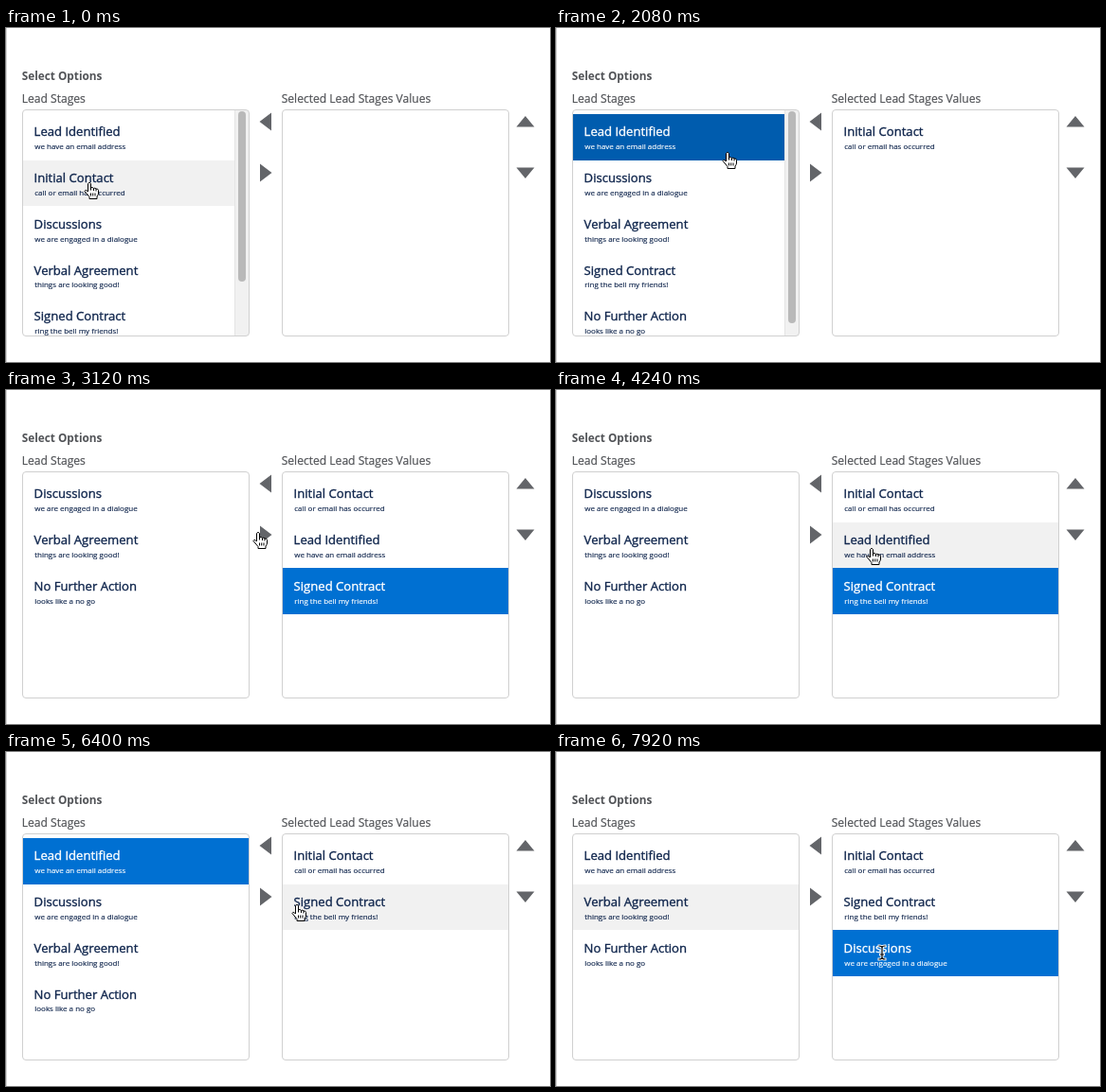
An HTML page for the animation above (8000 ms loop, 574 px wide and 353 px high).

```html
<!DOCTYPE html>
<html>
<head>
<meta charset="utf-8">
<style>
  html, body { margin: 0; width: 100%; height: 100%; overflow: hidden; background: #fff; }
  svg { display: block; font-family: "Open Sans", sans-serif; }
  .head { font-size: 12.1px; fill: #515357; stroke: #515357; stroke-width: .2; }
  .title { font-size: 11.8px; font-weight: 700; stroke: none; }
  .name { font-size: 13.1px; stroke-width: .35; }
  .note { font-size: 8px; stroke-width: .15; }
</style>
</head>
<body>
<svg width="574" height="353" viewBox="0 0 574 353">
  <clipPath id="inside"><path d="M18 87H256V325H18ZM292 87H530V325H292Z"/></clipPath>
  <path d="M.5 0V353" stroke="#d4d4d4"/>
  <text class="head title" x="16.7" y="55">Select Options</text>
  <text class="head" x="16.7" y="79">Lead Stages</text>
  <text class="head" x="290.7" y="79">Selected Lead Stages Values</text>
  <path d="M267.5 99L280 89.5V108.5ZM280.5 153L268 143.5V162.5ZM548 93L557.5 104.5H538.5ZM548 159L557.5 147.5H538.5Z" fill="#636569"/>
  <g id="lists" clip-path="url(#inside)"></g>
  <g fill="none" stroke="#d0d0d0">
    <rect x="17.5" y="86.5" width="239" height="239" rx="3.5"/>
    <rect x="291.5" y="86.5" width="239" height="239" rx="3.5"/>
  </g>
  <path id="hand" fill="#fff" stroke="#000" stroke-linejoin="round"
    d="M-1.5 1.5Q0-1 1.5 1.5V6Q3 4.5 4.5 6.5Q6 5.5 7 7Q9 6.5 9.5 8.5V12Q9 14 8 15V17.5H0V15.5L-5 9.5Q-4.5 7.5-2.5 9L-1.5 10ZM1.5 6V8.5M4.5 6.5V9M7 7V9.5M1.5 11.5V14.5M3.7 11.5V14.5M6 11.5V14.5"/>
  <g id="beam" fill="none" stroke-linecap="square">
    <path id="bar" d="M-3-7Q0-7 0-5Q0-7 3-7M0-5V5M-3 7Q0 7 0 5Q0 7 3 7M-1.5 2H1.5" stroke="#fff" stroke-width="3"/>
    <use href="#bar" style="display:none"/>
    <path d="M-3-7Q0-7 0-5Q0-7 3-7M0-5V5M-3 7Q0 7 0 5Q0 7 3 7M-1.5 2H1.5" stroke="#000" stroke-width="1.2"/>
  </g>
</svg>
<script>
const LOOP = 8000, STEP = 80, GLIDE = 320;
const TOP = 91, ROW = 48.75, LEFT_X = 18, RIGHT_X = 292, WIDTH = 238;
const $ = id => document.getElementById(id);

const stages = {
  L: ['Lead Identified', 'we have an email address'],
  I: ['Initial Contact', 'call or email has occurred'],
  D: ['Discussions', 'we are engaged in a dialogue'],
  V: ['Verbal Agreement', 'things are looking good!'],
  S: ['Signed Contract', 'ring the bell my friends!'],
  N: ['No Further Action', 'looks like a no go'],
};

// Each stage is selected at one time and changes lists at another
const actions = [
  { key: 'I', select: 240, move: 960 },
  { key: 'L', select: 1760, move: 2320 },
  { key: 'S', select: 2880, move: 3120 },
  { key: 'L', select: 4400, move: 5280 },
  { key: 'D', select: 7040, move: 7600 },
];

// Pointer stops: arrival time, x, y, shape
const arrow = [266, 150];
const stops = [
  [0, 88, 163], [800, ...arrow], [1520, 106, 162], [1760, 95, 112],
  [2240, ...arrow], [2640, 87, 198], [3120, ...arrow], [4160, 333, 167],
  [4640, 350, 167, 'beam'], [6640, 75, 128], [7040, 70, 161],
  [7600, 362, 208, 'beam'], [7920, 344, 212, 'beam'],
];

function listsAt(t) {
  let right = [], selected;
  for (const { key, select, move } of actions) {
    if (t >= select) selected = key;
    if (t >= move) right = right.includes(key) ? right.filter(k => k !== key) : [...right, key];
  }
  const left = Object.keys(stages).filter(k => !right.includes(k));
  return { left, right, selected };
}

function pointerAt(t) {
  const departure = i => i ? Math.max(stops[i - 1][0], stops[i][0] - GLIDE) : 0;
  const i = stops.findLastIndex((_, n) => departure(n) <= t);
  const [arrival, x1, y1, shape = 'hand'] = stops[i];
  const [, x0, y0] = stops[Math.max(0, i - 1)];
  const p = Math.min(1, (t - departure(i)) / (arrival - departure(i) || 1));
  const k = i ? p * p * (3 - 2 * p) : 1;
  const x = x0 + (x1 - x0) * k, y = y0 + (y1 - y0) * k;
  // While dragging, the row where the drag began stays highlighted
  const hover = shape === 'hand' ? [x, y] : stops.slice(0, i).findLast(s => !s[3]).slice(1);
  return { x, y, shape, hover };
}

function drawList(keys, left, selected, [px, py]) {
  const edge = i => TOP + Math.ceil(i * ROW - .5);
  const width = keys.length > 4 ? WIDTH - 15 : WIDTH;
  const hovered = px > left && px < left + WIDTH ? Math.floor((py - TOP) / ROW) : -1;
  return keys.map((key, i) => {
    const on = key === selected, over = i === hovered;
    const fill = on ? (over ? '#005cae' : '#0070d2') : over ? '#f1f1f1' : '#fff';
    const ink = on ? '#fff' : '#10264d';
    const [name, note] = stages[key];
    return `<rect x="${left}" y="${edge(i)}" width="${width}" height="${edge(i + 1) - edge(i)}" fill="${fill}"/>
      <g fill="${ink}" stroke="${ink}">
        <text class="name" x="${left + 11.6}" y="${TOP + 23 + Math.ceil(i * ROW)}">${name}</text>
        <text class="note" x="${left + 12.2}" y="${TOP + 37 + Math.round(i * ROW)}">${note}</text>
      </g>`;
  }).join('');
}

function drawScrollbar(count) {
  if (count < 5) return '';
  return `<rect x="241" y="87" width="15" height="238" fill="#f1f1f1"/>
    <path d="M241.5 87V325" stroke="#e4e4e4"/>
    <rect x="245" y="88" width="8" height="${444 - 44 * count}" rx="4" fill="#b9b9b9"/>`;
}

function render(t) {
  const { left, right, selected } = listsAt(t);
  const { x, y, shape, hover } = pointerAt(t);
  $('lists').innerHTML = drawList(left, LEFT_X, selected, hover) +
    drawScrollbar(left.length) + drawList(right, RIGHT_X, selected, hover);
  for (const id of ['hand', 'beam']) {
    $(id).setAttribute('transform', `translate(${Math.round(x)} ${Math.round(y)})`);
    $(id).setAttribute('visibility', id === shape ? 'visible' : 'hidden');
  }
}

let shownStep = -1;
const start = performance.now();
function tick() {
  const step = Math.floor((performance.now() - start) % LOOP / STEP);
  if (step !== shownStep) render((shownStep = step) * STEP);
  requestAnimationFrame(tick);
}
tick();
</script>
</body>
</html>
```
